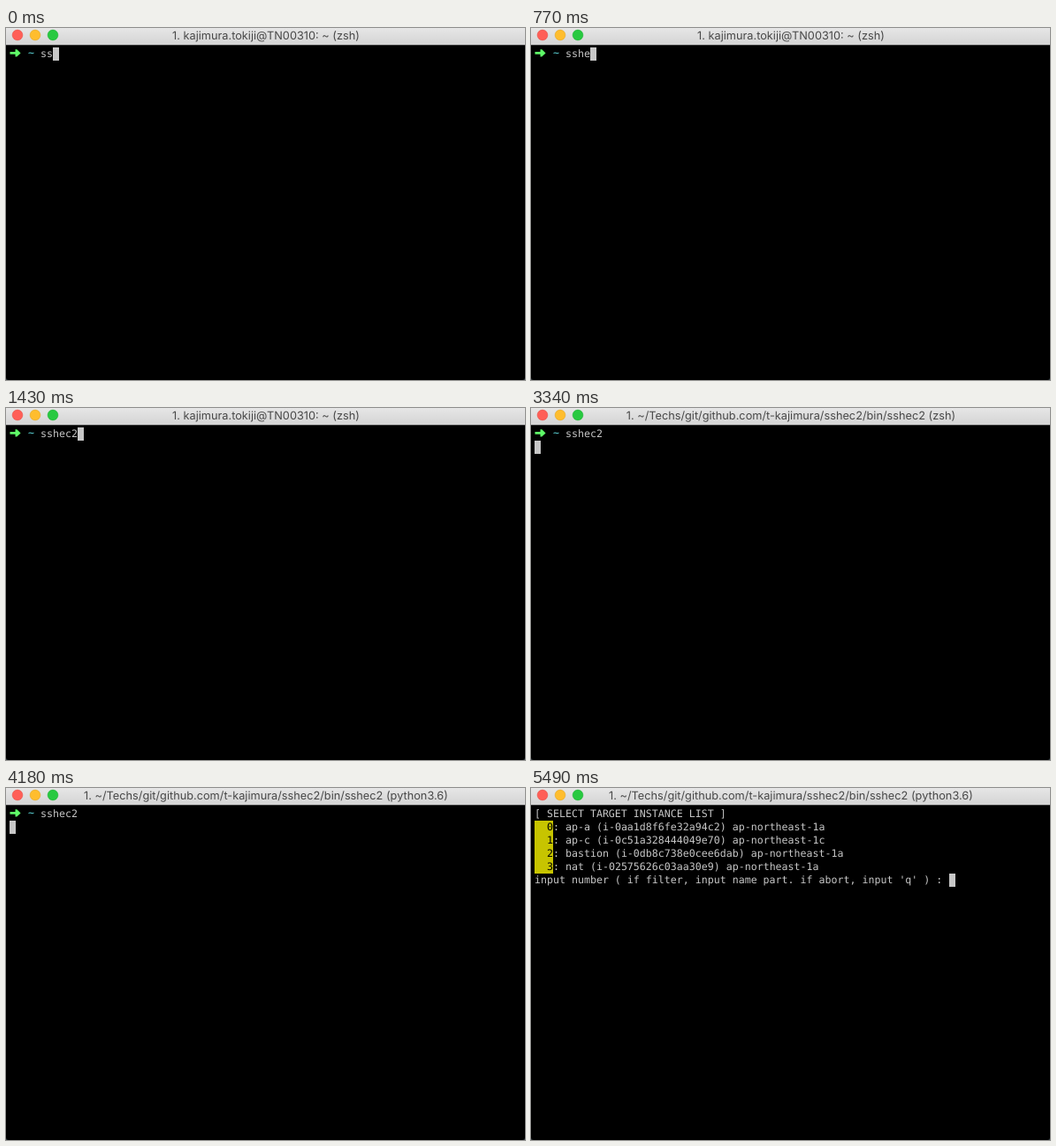
These frames come from a looping animation (587x399 px, 8000 ms). An HTML page:

```html
<!DOCTYPE html>
<html lang="en">
<head>
<meta charset="utf-8">
<title>Terminal</title>
<style>
  html, body { margin: 0; width: 100%; height: 100%; overflow: hidden; background: #000; }
  svg { display: block; width: 587px; height: 399px; }
  text { white-space: pre; text-rendering: geometricPrecision; }
  .title { font: 12.75px Inter, Roboto, sans-serif; fill: #484848; text-anchor: middle; }
  .mono { font: 11.628px "DejaVu Sans Mono", "Liberation Mono", monospace; fill: #c7c7c7; }
</style>
</head>
<body>
<svg viewBox="0 0 587 399" xmlns="http://www.w3.org/2000/svg">
  <defs>
    <linearGradient id="bar" x2="0" y2="1">
      <stop offset="0" stop-color="#e6e6e6"/>
      <stop offset="1" stop-color="#d4d4d4"/>
    </linearGradient>
  </defs>
  <rect y="380" width="587" height="19" fill="#3c464c"/>
  <rect width="587" height="399" rx="3"/>
  <rect width="587" height="19" fill="url(#bar)"/>
  <rect y="19" width="587" height="1" fill="#3a3a3a"/>
  <g stroke-width="0.5">
    <circle cx="13" cy="8" r="5.9" fill="#ff5f57" stroke="#e2463f"/>
    <circle cx="33" cy="8" r="5.9" fill="#ffbd2e" stroke="#e1a116"/>
    <circle cx="53" cy="8" r="5.9" fill="#28c940" stroke="#12ac28"/>
  </g>
  <text id="title" class="title" x="294" y="13"></text>

  <g id="prompt">
    <path d="M4.5 27H10.5V24.2H12.3L16.6 28.4L12.3 32.6H10.5V29.8H4.5Z" fill="#5ffa68"/>
    <text class="mono" x="25" y="32" style="fill:#60dfe2">~</text>
    <text id="command" class="mono" x="39" y="33"></text>
  </g>
  <g id="menu"></g>
  <rect id="cursor" width="7" height="15" fill="#c7c7c7"/>
</svg>
<script>
const LOOP = 8000, CELL = 7, LINE = 15, LEFT = 4, TOP = 22;
const $ = id => document.getElementById(id);

const script = "~/Techs/git/github.com/t-kajimura/sshec2/bin/sshec2";
const titles = [
  [0, "1. kajimura.tokiji@TN00310: ~ (zsh)"],
  [3340, `1. ${script} (zsh)`],
  [4180, `1. ${script} (python3.6)`]
];
const typed = [[0, "ss"], [300, "ssh"], [770, "sshe"], [1010, "sshec"], [1430, "sshec2"]];
const ENTER = 3280, MENU = 5490;

const instances = [
  "ap-a (i-0aa1d8f6fe32a94c2) ap-northeast-1a",
  "ap-c (i-0c51a328444049e70) ap-northeast-1c",
  "bastion (i-0db8c738e0cee6dab) ap-northeast-1a",
  "nat (i-02575626c03aa30e9) ap-northeast-1a"
];
const question = "input number ( if filter, input name part. if abort, input 'q' ) : ";

function add(name, attrs, content = "") {
  const node = document.createElementNS("http://www.w3.org/2000/svg", name);
  for (const key in attrs) node.setAttribute(key, attrs[key]);
  node.textContent = content;
  $("menu").append(node);
}

function write(col, row, content, style = "") {
  add("text", { class: "mono", x: LEFT + col * CELL, y: TOP + row * LINE + 11, style }, content);
}

function buildMenu() {
  write(0, 0, "[ SELECT TARGET INSTANCE LIST ]");
  add("rect", { x: LEFT, y: TOP + LINE, width: 3 * CELL, height: instances.length * LINE, fill: "#c7c400" });
  instances.forEach((name, i) => {
    write(2, i + 1, String(i), "fill:#000");
    write(3, i + 1, ": " + name);
  });
  write(0, instances.length + 1, question);
}

const current = (steps, t) => steps.filter(([start]) => start <= t).pop()[1];

function setText(id, value) {
  if ($(id).textContent !== value) $(id).textContent = value;
}

function placeCursor(col, row) {
  $("cursor").setAttribute("x", LEFT + col * CELL);
  $("cursor").setAttribute("y", TOP + row * LINE);
}

function render(t) {
  const command = current(typed, t), showMenu = t >= MENU;
  setText("title", current(titles, t));
  setText("command", command);
  $("prompt").style.display = showMenu ? "none" : "";
  $("menu").style.display = showMenu ? "" : "none";
  if (showMenu) placeCursor(question.length, instances.length + 1);
  else if (t >= ENTER) placeCursor(0, 1);
  else placeCursor(5 + command.length, 0);
}

buildMenu();
render(0);
const begin = performance.now();
function tick() {
  render((performance.now() - begin) % LOOP);
  requestAnimationFrame(tick);
}
requestAnimationFrame(tick);
</script>
</body>
</html>
```
